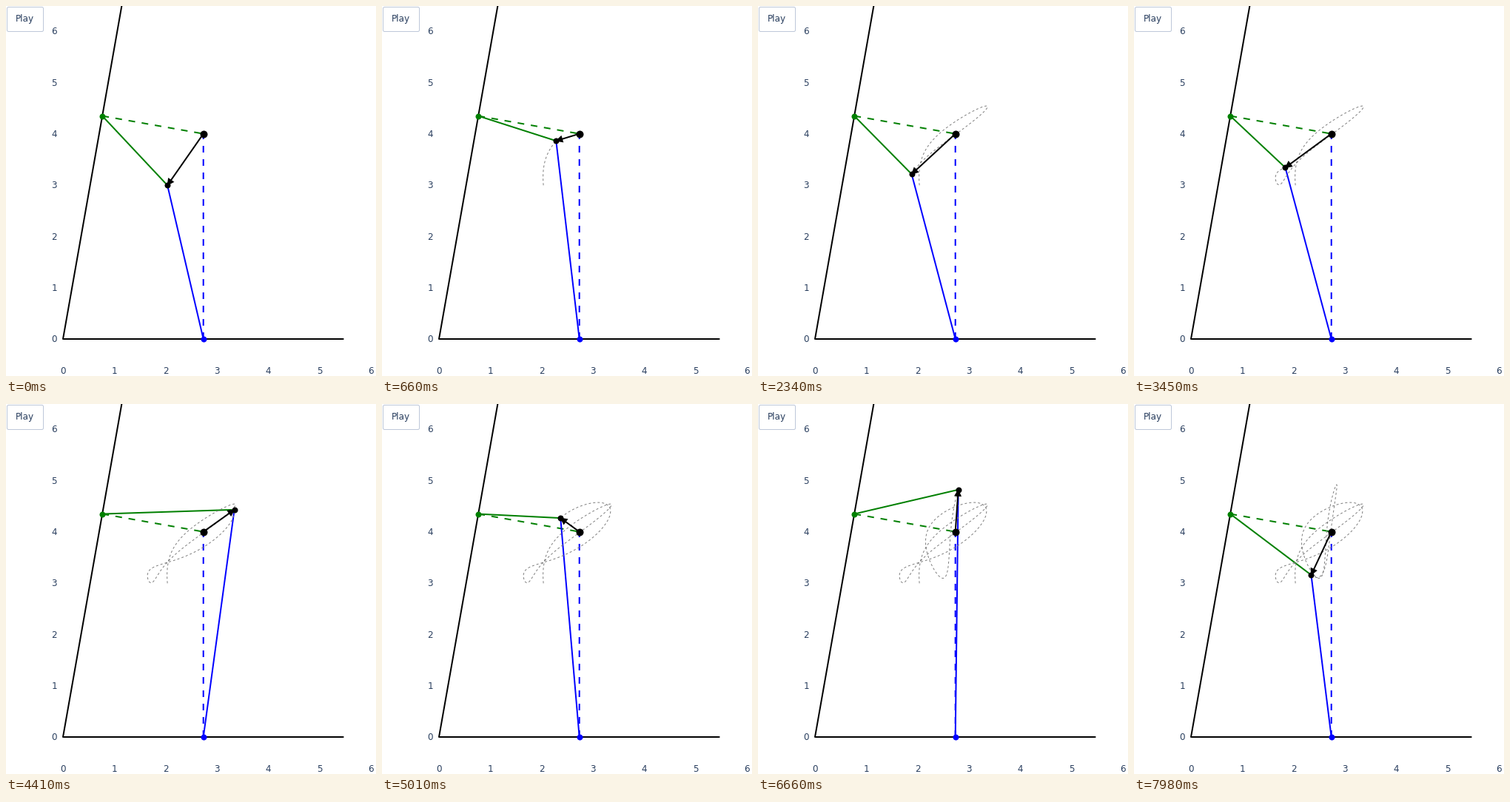
Animation, 500 px wide and 500 px high, one loop 8 s. Source, as a matplotlib script:

```python
import numpy as np
import matplotlib.pyplot as plt
from matplotlib.animation import FuncAnimation
from matplotlib.patches import FancyBboxPatch, Polygon

SIZE, DPI = 500, 100
PX = 72 / DPI                     # one pixel in points
FRAMES, LOOP_MS = 267, 8000
STEP, SUB = 0.03, 2               # seconds per frame, integration substeps
ORIGIN, UNIT = np.array([77.0, 450.0]), 416 / 6
INK = "#2a3f5f"

# Geometry: a wedge of 80 degrees, rest point 4 above one side and 2 from the other
WEDGE = np.radians(80)
SIDE = np.array([np.cos(WEDGE), np.sin(WEDGE)])
REST_BLUE, REST_GREEN = 4.0, 2.0
home = np.array([(REST_GREEN + REST_BLUE * SIDE[0]) / SIDE[1], REST_BLUE])
blue_foot = np.array([home[0], 0.0])
green_foot = SIDE * (home @ SIDE)

# Known positions of the bob in pixels: (frame, x, y) and (frame, x)
MARKS = np.array([
    (0, 218.2, 242), (42, 308, 135), (78, 209, 226.3), (147, 309, 141.5),
    (188, 244, 232.5), (222, 271.8, 114), (266, 239.8, 230.4),
])
X_MARKS = np.array([(54, 290), (135, 289), (162, 279)])


def to_px(p):
    return ORIGIN + UNIT * np.asarray(p) * [1, -1]


def accel(q, k_blue, k_green):
    total = np.zeros_like(q)
    for foot, rest, k in ((blue_foot, REST_BLUE, k_blue),
                          (green_foot, REST_GREEN, k_green)):
        d = q - foot[:, None]
        length = np.hypot(d[0], d[1])
        total -= k * (1 - rest / length) * d
    return total


def swing(params):
    """Paths in pixels, shape (frames, 2, m), for m columns of parameters."""
    k_blue, k_green, x0, y0 = params
    h = STEP / SUB
    q = np.array([(x0 - ORIGIN[0]) / UNIT, (ORIGIN[1] - y0) / UNIT])
    v = np.zeros_like(q)
    a = accel(q, k_blue, k_green)
    path = np.empty((FRAMES,) + q.shape)
    path[0] = q
    for n in range(1, FRAMES):
        for _ in range(SUB):
            v = v + a * h / 2
            q = q + v * h
            a = accel(q, k_blue, k_green)
            v = v + a * h / 2
        path[n] = q
    return ORIGIN[:, None] + UNIT * path * np.array([[1], [-1]])


def misfit(params):
    path = swing(params)
    at = MARKS[:, 0].astype(int)
    dx = path[at, 0] - MARKS[:, 1:2]
    dy = path[at, 1] - MARKS[:, 2:3]
    edge = 0.5 * (path[X_MARKS[:, 0], 0] - X_MARKS[:, 1:2])
    return np.vstack([dx, dy, edge])


def solve():
    """Spring constants and start that lead the bob through the marks."""
    kb, kg = np.meshgrid(np.linspace(6, 11, 41), np.linspace(8, 15, 57))
    kb, kg = kb.ravel(), kg.ravel()
    grid = np.array([kb, kg, np.full_like(kb, 218.2), np.full_like(kb, 242)])
    p = grid[:, np.argmin((misfit(grid) ** 2).sum(axis=0))]
    eps = np.array([1e-4, 1e-4, 1e-3, 1e-3])
    for _ in range(14):
        r = misfit(p[:, None] + np.hstack([np.zeros((4, 1)), np.diag(eps)]))
        jac = (r[:, 1:] - r[:, :1]) / eps
        p = p - 0.7 * np.linalg.lstsq(jac, r[:, 0], rcond=None)[0]
    return p


bob_path = swing(solve()[:, None])[:, :, 0]
HOME, BLUE, GREEN = to_px(home), to_px(blue_foot), to_px(green_foot)

fig = plt.figure(figsize=(SIZE / DPI, SIZE / DPI), dpi=DPI, facecolor="white")
ax = fig.add_axes([0, 0, 1, 1])
ax.set_xlim(0, SIZE)
ax.set_ylim(SIZE, 0)
ax.axis("off")


def line(points, color, z, width=2, dash=None):
    xs, ys = np.transpose(points)
    style = (0, (dash / width, dash / width)) if dash else "-"
    return ax.plot(xs, ys, color=color, lw=width * PX, ls=style, zorder=z,
                   solid_capstyle="butt", dash_capstyle="butt", snap=False)[0]


def dot(p, color, radius):
    return ax.plot([p[0]], [p[1]], "o", color=color, ms=2 * radius * PX,
                   mew=0, zorder=6, snap=False)[0]


def label(x, y, text):
    ax.text(x, y, text, family="DejaVu Sans", size=12 * PX, color=INK,
            ha="center", va="baseline")


ax.add_patch(FancyBboxPatch((1.5, 1.5), 49, 33, fc="white", ec="#bec8d9",
                            boxstyle="round,pad=0,rounding_size=2",
                            lw=PX, snap=False))
label(25.5, 21.2, "Play")
for i in range(7):
    label(ORIGIN[0] + UNIT * i, 497.3, str(i))
    label(65.2, ORIGIN[1] - UNIT * i + 4.3, str(i))

line([to_px((2 * home[0], 0)), ORIGIN, to_px(SIDE * 8)], "black", 1)
line([BLUE, HOME], "blue", 2, dash=9)
line([GREEN, HOME], "green", 2, dash=9)
blue_rod = line([BLUE, HOME], "blue", 3)
green_rod = line([GREEN, HOME], "green", 3)
trace = line([HOME, HOME], "gray", 4, width=1, dash=3)
dot(HOME, "black", 5)
dot(BLUE, "blue", 4)
dot(GREEN, "green", 4)
bob = dot(HOME, "black", 4)
shaft = line([HOME, HOME], "black", 7)
head = ax.add_patch(Polygon(np.zeros((3, 2)), fc="black", lw=0, zorder=8,
                            snap=False))


def update(n):
    p = bob_path[n]
    for rod, foot in ((blue_rod, BLUE), (green_rod, GREEN), (shaft, HOME)):
        rod.set_data([foot[0], p[0]], [foot[1], p[1]])
    trace.set_data(bob_path[:n + 1, 0], bob_path[:n + 1, 1])
    bob.set_data([p[0]], [p[1]])
    along = (p - HOME) / max(np.hypot(*(p - HOME)), 1e-6)
    across = np.array([-along[1], along[0]])
    base = p - 9 * along
    head.set_xy([base + 5 * across, base - 5 * across, p + along])
    return blue_rod, green_rod, trace, bob, shaft, head


anim = FuncAnimation(fig, update, frames=FRAMES, interval=LOOP_MS / FRAMES,
                     init_func=lambda: update(0), repeat=True, repeat_delay=0)
plt.show()
```
